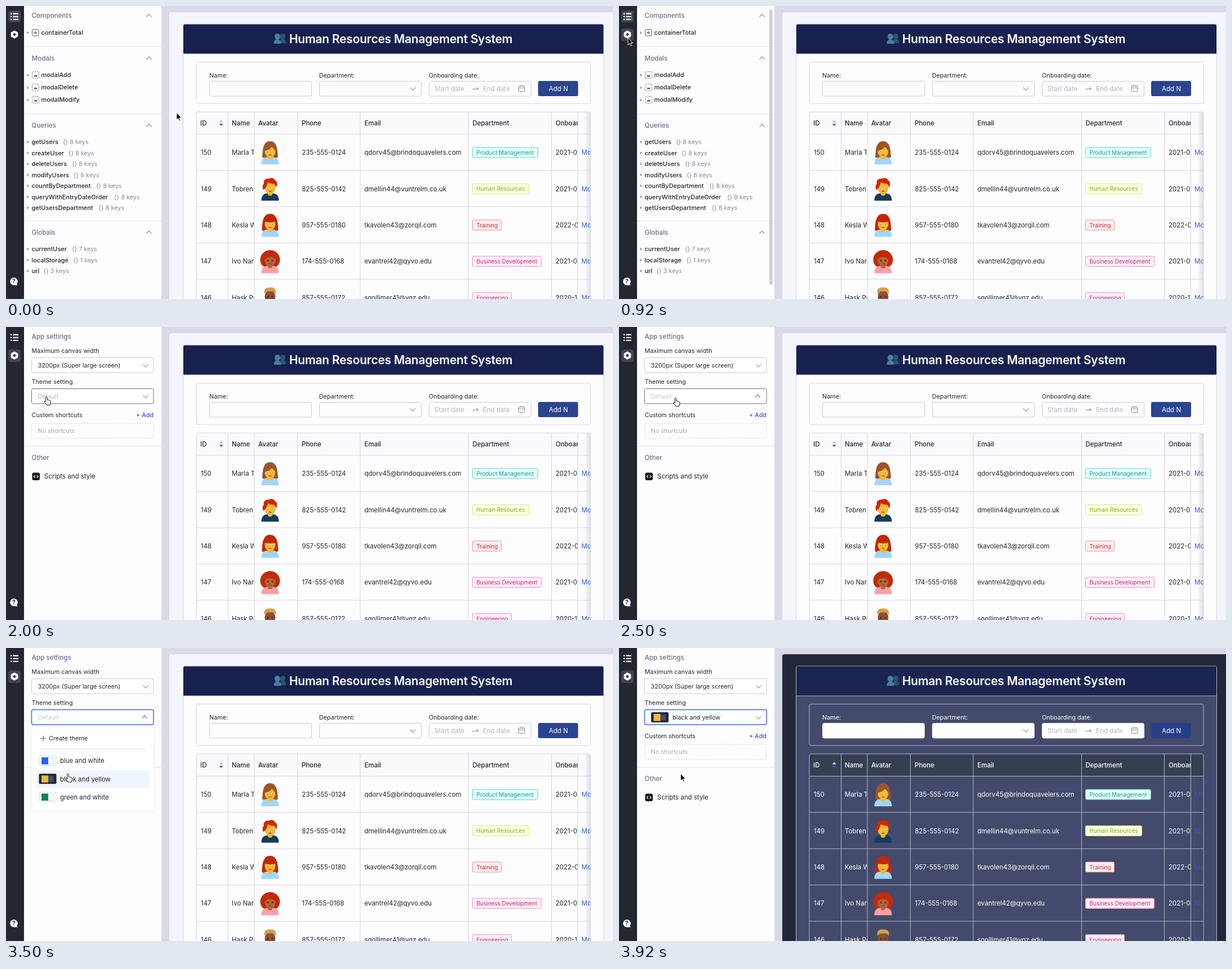
Animation of 1078x520 px, one loop 5.08 s. Source, as an HTML page:

```html
<!DOCTYPE html>
<html lang="en">
<head>
<meta charset="utf-8">
<title>Theme setting</title>
<style>
html, body { margin: 0; width: 100%; height: 100%; overflow: hidden; background: #d9d9e7; }
#stage {
  --canvas: #f4f5fb; --head: #17204f; --body: #fdfdff; --line: #d3d5e3; --field: #fdfdff; --edge: #c9ccd9;
  --label: #23262f; --cell: #23262f; --th: #fafafd; --thText: #23262f; --id: #23262f;
  --caret: #b4b7c3; --button: #2b448f; --link: #2f62ea;
  display: block; width: 1078px; height: 520px;
  font-family: Inter, Roboto, sans-serif; font-optical-sizing: none;
}
#stage.dark {
  --canvas: #23273a; --head: #1c2552; --body: #434a6b; --line: #b4bacd; --field: #fff; --edge: #f1f2f8;
  --label: #fff; --cell: #fff; --thText: #fff; --id: #fff;
  --caret: #f4f5fb; --button: #273e89; --link: #3159d6;
}
text { white-space: pre; }
.grid { stroke: var(--line); fill: none; }
</style>
</head>
<body>
<svg id="stage" viewBox="0 0 1078 520"></svg>
<script>
const LOOP = 5080;
const INK = '#23262f', GREY = '#6b728b', PALE = '#b3b6c2', EDGE = '#c9ccd9', BLUE = '#3455e8';

// Shape helpers; text is placed by its vertical centre
const text = (x, y, s, size = 10.8, fill = INK, weight = 400, more = '') =>
  `<text x="${x}" y="${y + size * 0.36}" font-size="${size}" font-weight="${weight}" style="fill:${fill}" ${more}>${s}</text>`;
const rect = (x, y, w, h, fill, r = 0, stroke = 'none', more = '') =>
  `<rect x="${x}" y="${y}" width="${w}" height="${h}" rx="${r}" style="fill:${fill};stroke:${stroke}" ${more}/>`;
const path = (d, stroke, fill = 'none', width = 1.2, more = '') =>
  `<path d="${d}" style="fill:${fill};stroke:${stroke}" stroke-width="${width}" ${more}/>`;
const circle = (x, y, r, fill) => `<circle cx="${x}" cy="${y}" r="${r}" fill="${fill}"/>`;
const group = (id, body, more = '') => `<g id="${id}" ${more}>${body}</g>`;
const chevron = (x, y, up, color, id = '') =>
  path(`M${x - 4.5} ${y + (up ? 2.5 : -2.5)}l4.5 ${up ? -5 : 5} 4.5 ${up ? 5 : -5}`, color, 'none', 1.1, id && `id="${id}"`);
const clip = (x, y, w, h, body) =>
  `<svg x="${x}" y="${y}" width="${w}" height="${h}" viewBox="${x} ${y} ${w} ${h}">${body}</svg>`;

function navBar() {
  let s = rect(0, 0, 32, 520, '#242730');
  s += rect(4, 8, 22, 21, '#414550', 4, 'none', 'id="nav1"') + rect(4, 40, 22, 22, '#414550', 4, 'none', 'id="nav2"');
  for (const y of [13.6, 18.7, 23.8]) s += path(`M12.5 ${y}H22M8 ${y}h2.500`, '#fff', 'none', 2.1);
  s += path('M15 44.2l5.6 3.2v6.4L15 57l-5.6-3.2v-6.4z', '#fff', '#fff', 1.4, 'stroke-linejoin="round"');
  s += circle(15, 50.6, 2.4, '#2b2e38');
  s += circle(14, 488.7, 6.8, '#fff') + path('M17 491l4 4.4-6 .1z', 'none', '#fff');
  return s + text(14, 488.7, '?', 10.5, '#242730', 700, 'text-anchor="middle"');
}

const divider = y => rect(32, y, 244, 1, '#e0e2eb');
const treeCaret = y => path(`M37.5 ${y - 2.6}l3.8 2.6-3.8 2.6z`, 'none', '#9296a5');

function treePanel() {
  const heads = [['Components', 17], ['Modals', 92.5], ['Queries', 212], ['Globals', 401.5]];
  let s = heads.map(([name, y]) => group('sec' + name,
    text(45.5, y, name, 11.67, 'currentColor', 500) + chevron(254, y, true, 'currentColor'), `color="${GREY}"`)).join('');
  s += [71.5, 191, 381].map(divider).join('');
  s += treeCaret(47.5) + rect(46.5, 41.5, 11.5, 11.5, 'none', 2, '#585d6d') + path('M49.2 47.3h6M52.2 44.3v6', '#585d6d');
  s += text(62.5, 47.3, 'containerTotal', 10.9, INK, 500);
  ['modalAdd', 'modalDelete', 'modalModify'].forEach((name, i) => {
    const y = 122.5 + i * 22;
    s += treeCaret(y + .5) + rect(46.5, y - 6, 12, 12, 'none', 1, '#747a8a', 'stroke-dasharray="2.2 1.6"');
    s += rect(50, y + .5, 5.5, 2.5, '#585d6d') + text(62.5, y, name, 10.9, INK, 500);
  });
  const rows = (list, top) => list.forEach(([name, x, n], i) => {
    const y = top + i * 19.47;
    s += treeCaret(y) + text(45.5, y, name, 10.9, INK, 500) + text(x, y, `{} ${n} keys`, 10.8, '#868b9c');
  });
  rows([['getUsers', 101, 8], ['createUser', 111, 8], ['deleteUsers', 117, 8], ['modifyUsers', 120, 8],
    ['countByDepartment', 160, 8], ['queryWithEntryDateOrder', 192, 8], ['getUsersDepartment', 164.5, 8]], 241.3);
  rows([['currentUser', 117, 7], ['localStorage', 119.5, 1], ['url', 66.5, 3]], 431.3);
  return s;
}

const swatch = (x, y, main, back, side, edge) =>
  rect(x + .5, y + .5, 30, 17, back, 1, edge) + rect(x + 16, y + 3.5, 10.5, 11.5, side, 0, edge) +
  rect(x + 4.5, y + 3, 12, 12.5, main);
const SWATCHES = {
  'blue and white': ['#2463f5', '#fff', '#fff', '#d9dbe4'],
  'black and yellow': ['#efb93f', '#23273a', '#454d68', '#23273a'],
  'green and white': ['#0b8457', '#fff', '#fff', '#d9dbe4']
};

function settingsPanel() {
  let s = text(45.5, 17, 'App settings', 11.67, GREY, 500);
  s += text(45.5, 42.5, 'Maximum canvas width') + rect(45.5, 54.5, 216.5, 26.5, '#fff', 3, EDGE);
  s += text(56.5, 68.3, '3200px (Super large screen)') + chevron(248, 68.5, false, '#858998');
  s += text(45.5, 97.5, 'Theme setting');
  s += rect(44.3, 108.3, 219, 29, '#e9edff', 4, 'none', 'id="halo"') + rect(45.5, 109.5, 216.5, 26.5, '#fff', 3, EDGE, 'id="themeBox"');
  s += text(56.5, 123.3, 'Default', 10.8, PALE, 400, 'id="empty"');
  s += group('chosen', swatch(57, 114, ...SWATCHES['black and yellow']) + text(95, 123.3, 'black and yellow', 10.8));
  s += chevron(248, 123.5, false, '#858998', 'arrowDown') + chevron(246, 122.5, true, BLUE, 'arrowUp');
  s += text(45.5, 155.7, 'Custom shortcuts') + text(231, 155.7, '+ Add', 10.8, BLUE, 500);
  s += rect(45.5, 171, 216.5, 26.5, 'none', 3, '#d3d5df', 'stroke-dasharray="2.5 2"') + text(56.5, 184.3, 'No shortcuts', 10.8, '#a5a9b6');
  s += divider(211) + text(45.5, 232, 'Other', 11.67, GREY, 500);
  s += rect(46.5, 258.5, 13.5, 13.5, '#17181d', 3) + path('M51.8 262.9l-2.3 2.3 2.3 2.3M54.7 262.9l2.3 2.3-2.3 2.3', '#fff');
  return s + text(68, 265.3, 'Scripts and style', 11.5);
}

function dropdown() {
  let s = rect(45, 140, 217.5, 149, '#fff', 4, 'none', 'filter="url(#soft)"');
  s += path('M61 160.5h10M66 155.5v10', '#555a69', 'none', 1.1) + text(76, 160.5, 'Create theme');
  s += rect(58.5, 178.7, 189.5, 1, '#e0e2ea');
  Object.keys(SWATCHES).forEach((name, i) => {
    const y = 200 + i * 32.2;
    s += rect(53, y - 15.5, 202, 31.5, '#eef5fd', 2, 'none', `id="row${i}"`);
    s += swatch(58.5, y - 9, ...SWATCHES[name]) + text(96, y + .3, name, 11.4, INK, 400, `id="name${i}"`);
  });
  return s;
}

function formCard() {
  const label = (x, s) => text(x, 122.7, s, 10.8, 'var(--label)');
  const field = x => rect(x + .5, 133.5, 181, 26.5, 'var(--field)', 3, 'var(--edge)');
  let s = rect(338, 99.5, 700, 73.5, 'none', 3, 'var(--line)');
  s += label(361, 'Name:') + label(556, 'Department:') + label(751, 'Onboarding date:');
  s += field(361) + field(556) + field(751) + chevron(722.5, 147, false, '#7d8191');
  s += text(761, 147, 'Start date', 11.5, PALE) + text(847, 147, 'End date', 11.5, PALE);
  s += path('M828 147.5h10.5l-3.2-3', '#858998');
  s += rect(910.5, 142, 10.5, 9.5, 'none', 1, '#858998') + path('M910.5 145.3h10.5M913.5 140v3M918 140v3', '#858998', 'none', 1);
  return s + rect(945, 133, 71, 27, 'var(--button)', 3) + text(964, 147, 'Add N', 11.6, '#fff');
}

// Cartoon bust centred on (469, y)
const FRINGES = {
  part: 'M458 4c-3-16 3-21 11-21s14 5 11 21c-1-7-4-11-8-14-3 5-9 6-12 7-1 2-2 4-2 7z',
  bangs: 'M458 4c-3-16 3-21 11-21s14 5 11 21c-.5-4-1-7-2-10-4 1.500-14 1.500-18 0-1 3-1.500 6-2 10z',
  swept: 'M457.500 2c-3-4-2-9 .5-11-2-7 5-10 9-9 5-3 10 0 11 3 4 1 4 8 2 13-1-3-2-5-4-7-5 0-9-1-11-3-1 6-4 11-7.500 14z',
  curls: 'M458 0c-2-11 5-15 11-15s13 4 11 15c-2-5-5-7.500-11-7.500S460-5 458 0z',
  flat: 'M459-6c-2-10 3-12 10-12s12 2 10 12c-2-4-4-5-10-5s-8 1-10 5z'
};
const BACKS = {
  part: 'M455 8C456-1 455-20 469-20s13 19 14 28c-3 4-25 4-28 0z',
  bangs: 'M454.500 9C455-1 455-20 469-20s14 19 14.500 29c-3 4-26 4-29 0z',
  curls: 'M451.500-3a17.500 17 0 1 1 35 0c0 8-5 15-17.500 15s-17.500-7-17.500-15z'
};

function avatar(y, { style, hair, skin = '#fbb72b', shirt }) {
  const at = (d, fill) => path(d, 'none', fill);
  let s = BACKS[style] ? at(BACKS[style], hair) : '';
  s += at('M453.5 21c0-9 4-13 11-13h9c7 0 11 4 11 13z', shirt);
  s += at('M465 5h8v5c-1 3-7 3-8 0z', skin) + `<ellipse cx="469" cy="-2" rx="9.500" ry="11" fill="${skin}"/>`;
  s += at(FRINGES[style], hair);
  const eye = skin === '#fbb72b' ? '#fff' : '#5b3322';
  for (const x of [465, 473]) s += circle(x, -1.5, 1.8, eye) + circle(x, -1.3, .9, '#4b2b20');
  s += path('M466.500 5q2.500-2 5 0', '#7a3b20', 'none', 1.1);
  return `<g transform="translate(0 ${y})">${s}</g>`;
}

const PEOPLE = [
  [150, 'Marla Te', '235-555-0124', 'qdorv45@brindoquavelers.com', '2021-04',
    ['Product Management', 116, '#e3fffb', '#5fd3d0', '#1f9795'], { style: 'part', hair: '#9b5528', shirt: '#9fd6ff' }],
  [149, 'Tobren V', '825-555-0142', 'dmellin44@vuntrelm.co.uk', '2021-06',
    ['Human Resources', 100, '#fcffe4', '#dcea6c', '#86ad17'], { style: 'swept', hair: '#cf2606', shirt: '#143b60' }],
  [148, 'Kesla Wi', '957-555-0180', 'tkavolen43@zorqil.com', '2022-01',
    ['Training', 51, '#fff0ef', '#f28b8b', '#cf2337'], { style: 'bangs', hair: '#c02806', shirt: '#9fd6ff' }],
  [147, 'Ivo Nard', '174-555-0168', 'evantrel42@qyvo.edu', '2021-03',
    ['Business Development', 122, '#fff0f7', '#f48cc0', '#c6227a'], { style: 'curls', hair: '#c12b08', skin: '#b2663c', shirt: '#fda0a6' }],
  [146, 'Hask Pel', '857-555-0172', 'sgollimer41@vqz.edu', '2020-11',
    ['Engineering', 69, '#fff0f7', '#f48cc0', '#c6227a'], { style: 'flat', hair: '#d5a04a', skin: '#8d4f33', shirt: '#ece6dc' }]
];

function table() {
  const cols = [[345, 'ID'], [401, 'Name'], [448, 'Avatar'], [525, 'Phone'], [636.5, 'Email'], [828.5, 'Department'], [976, 'Onboarding date']];
  let s = rect(338, 188, 700, 39, 'var(--th)', 3);
  cols.forEach(([x, name], i) => {
    const cell = text(x, 208, name, 11.5, i ? 'var(--thText)' : 'var(--id)', 500);
    s += i === 6 ? clip(969, 189, 46, 37, cell) : cell;
  });
  s += path('M378.7 206.5l3.5-4 3.5 4z', 'none', 'var(--caret)') + path('M378.7 209l3.5 4 3.5-4z', 'none', '#2f5df0');
  PEOPLE.forEach(([id, name, phone, mail, date, tag, look], i) => {
    const y = 260 + i * 64.4, top = y - 30;
    const cell = (x, v, fill = 'var(--cell)') => text(x, y, v, 11.5, fill);
    s += cell(346, id) + clip(395, top, 45.5, 60, cell(401, name)) + avatar(y, look);
    s += cell(525.5, phone) + cell(636.5, mail);
    s += rect(828.5, y - 9, tag[1], 18, tag[2], 2, tag[3]) + text(835.5, y + .4, tag[0], 10, tag[4]);
    s += clip(969, top, 46, 60, cell(976, date)) + clip(1016, top, 22, 60, cell(1022, 'Modify', 'var(--link)'));
  });
  s += rect(1027, 188, 11, 332, 'url(#shade)');
  const lines = [394.5, 441, 517.5, 629, 821.5, 968.5, 1015.5].map(x => `M${x} 188V520`).join('') +
    [227.5, 291.7, 356.2, 420.6, 485].map(y => `M338 ${y}H1038`).join('');
  return s + `<path class="grid" d="M338 520V191q0-3 3-3H1035q3 0 3 3V520${lines}"/>`;
}

function page() {
  const bust = (x, y, k, fill) =>
    path('M-6.5 9c0-5 2-6.5 4.5-7.5a5 5.5 0 1 1 4 0c2.5 1 4.5 2.5 4.5 7.5z', 'none', fill, 0, `transform="translate(${x} ${y}) scale(${k})"`);
  let s = path('M290 520V15q0-4 4-4H1078V520z', 'none', 'var(--canvas)');
  s += rect(314.5, 32, 747, 500, 'var(--body)', 3, 'var(--line)') + path('M315 85V35q0-2.5 2.5-2.5H1058.5q2.5 0 2.5 2.5V85z', 'none', 'var(--head)');
  s += '<path class="grid" d="M314.5 85H1061.5"/>';
  s += bust(491.5, 57.5, .95, '#2b566f') + bust(482, 58, 1, '#44809f');
  s += text(701.2, 58, 'Human Resources Management System', 21, '#fff', 600, 'text-anchor="middle" letter-spacing="-.25"');
  return s + formCard() + table();
}

const stage = document.getElementById('stage');
stage.innerHTML = `<defs>
  <filter id="soft" x="-10%" y="-10%" width="120%" height="120%"><feDropShadow dx="0" dy="0.5" stdDeviation="2" flood-color="#23273a" flood-opacity=".1"/></filter>
  <linearGradient id="shade"><stop stop-color="#23273a" stop-opacity="0"/><stop offset="1" stop-color="#23273a" stop-opacity=".14"/></linearGradient>
</defs>` + rect(0, 0, 1078, 520, '#d9d9e7') + page() + rect(32, 0, 244, 520, '#fdfdff') + navBar() +
  group('tree', treePanel()) + rect(267, 6, 5.5, 489, '#cdced9', 2.7, 'none', 'id="bar"') +
  group('settings', settingsPanel()) + group('menu', dropdown()) +
  group('cursor',
    path('M0 0V12.5L2.9 9.8 4.8 14.2 6.7 13.4 4.8 9.1H8.6Z', '#fff', '#000', .9, 'id="arrow"') +
    path('M-1.3 1.2a1.3 1.3 0 0 1 2.6 0v4.2c1-.6 2-.3 2.3.4 1-.4 1.8 0 2 .7 1-.2 1.8.3 1.8 1.5v2.5c0 1.5-1.2 2.2-1.2 4h-6c-.2-1.8-3.2-4-4-5.6-.5-1.1.8-1.8 1.6-1l1 1z', '#111', '#fff', 1, 'id="hand"'));

// Each step keeps what came before and changes only what it names
const STEPS = [
  [0, { x: 303, y: 189.5, row: -1, menu: 0, box: EDGE, th: '#fafafd' }],
  [250, { x: 287, y: 183 }],
  [420, { x: 208, y: 135, bar: 1 }],
  [500, { x: 150, y: 99, modals: 1 }],
  [670, { x: 56, y: 71, modals: 0 }],
  [750, { x: 32, y: 65 }],
  [920, { x: 16, y: 56.5, gear: 1 }],
  [1420, { x: 15.5, y: 57, hand: 1, settings: 1, bar: 0 }],
  [1750, { x: 26, y: 66, hand: 0 }],
  [1920, { x: 56, y: 104 }],
  [2000, { x: 72, y: 124, hand: 1, box: '#6b707e' }],
  [2170, { x: 90, y: 122 }],
  [2250, { x: 97, y: 122 }],
  [2500, { x: 100.5, y: 126, up: 1 }],
  [2670, { menu: .6, box: '#4669f0', focus: 1 }],
  [2750, { menu: 1 }],
  [2920, { x: 103, y: 168 }],
  [3000, { x: 105, y: 192, row: 0 }],
  [3170, { x: 108, y: 208 }],
  [3250, { x: 110, y: 218, row: 1 }],
  [3420, { y: 222 }],
  [3500, { y: 223.5 }],
  [3670, { x: 109.5, y: 223, hand: 0, row: -1, up: 0, dark: 1, id: INK, th: '#dadce3' }],
  [3750, { menu: .5, id: '#fff', th: '#858b99' }],
  [3920, { menu: 0, th: '#363e51' }]
];

const el = id => document.getElementById(id);
const show = (id, on) => { el(id).style.opacity = Number(on || 0); };

function draw() {
  const t = performance.now() % LOOP;
  const s = Object.assign({}, ...STEPS.filter(([at]) => at <= t).map(([, change]) => change));
  stage.classList.toggle('dark', !!s.dark);
  stage.style.setProperty('--th', s.th);
  if (s.id) stage.style.setProperty('--id', s.id);
  else stage.style.removeProperty('--id');
  show('tree', !s.settings);
  show('settings', s.settings);
  show('bar', s.bar);
  show('nav1', !s.settings);
  show('nav2', s.gear);
  el('secModals').setAttribute('color', s.modals ? '#3f4558' : GREY);
  el('themeBox').style.stroke = s.box;
  el('themeBox').style.strokeWidth = s.focus ? 1.5 : 1;
  show('halo', s.focus);
  show('empty', s.dark ? 0 : s.up ? .75 : 1);
  show('chosen', s.dark);
  show('arrowUp', s.up);
  show('arrowDown', !s.up);
  show('menu', s.menu);
  for (let i = 0; i < 3; i++) show('row' + i, s.row === i);
  el('name1').style.fill = s.dark ? BLUE : INK;
  el('cursor').setAttribute('transform', `translate(${s.x} ${s.y})`);
  show('arrow', !s.hand);
  show('hand', s.hand);
  requestAnimationFrame(draw);
}
draw();
</script>
</body>
</html>
```
